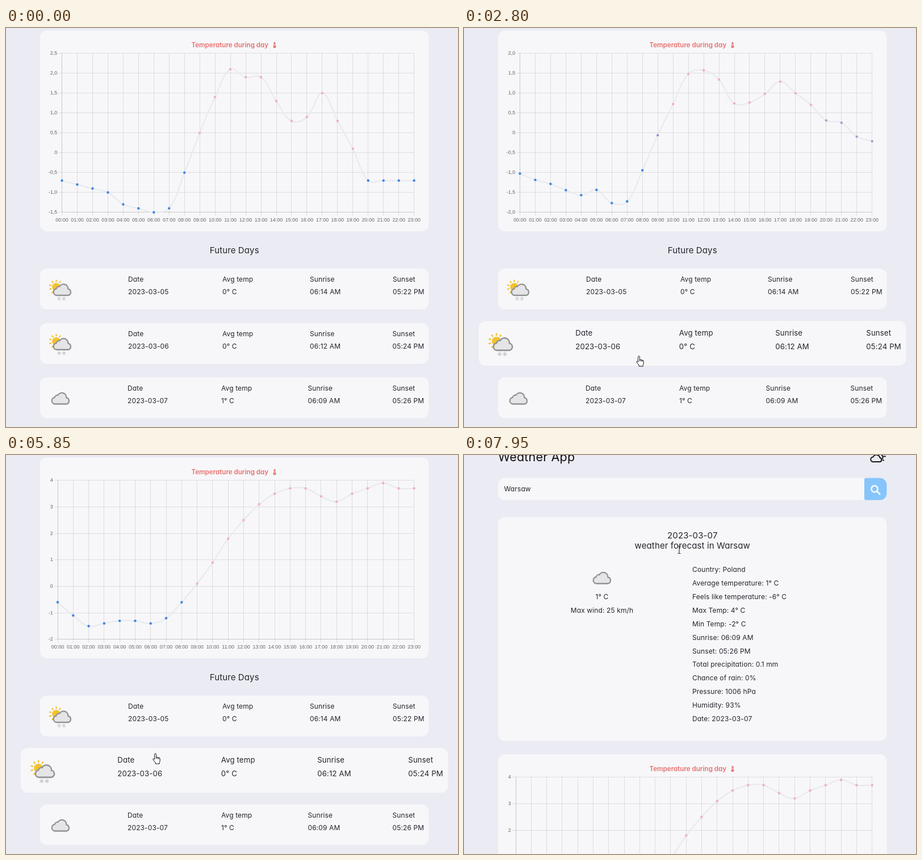
An HTML page for the animation above (8 s loop, 796 by 703 pixels).

```html
<!DOCTYPE html>
<html lang="en">
<head>
<meta charset="utf-8">
<title>Weather App</title>
<style>
  html, body { margin: 0; width: 100%; height: 100%; overflow: hidden; background: #ebebf4; }
  svg { display: block; }
  text { font: 12px Inter, "Open Sans", sans-serif; font-feature-settings: "cv11"; letter-spacing: .12px; fill: #23252b; white-space: pre; }
  .mid { text-anchor: middle; }
  .head { font-size: 15px; }
  .brand { font-size: 21.6px; fill: #111; }
  .title { font-size: 11.6px; font-weight: 600; letter-spacing: 0; fill: #e6716e; }
  .tick { font: 9px "Liberation Sans", Arial, sans-serif; letter-spacing: 0; fill: #666; }
  .end { text-anchor: end; }
  .card { fill: #f7f7fa; }
  .grid { fill: none; stroke: #000; stroke-opacity: .1; }
  .curve { fill: none; stroke: #e9eaee; stroke-width: 2.25; }
  .cloud { fill: #e5e5e7; stroke: #929294; stroke-width: 2.3; stroke-linejoin: round; }
  .ray { stroke: #efbd2d; stroke-width: 2; stroke-linecap: round; }
  .flake { stroke: #c6c6ca; stroke-width: 1.2; stroke-linecap: round; fill: none; }
  .cursor { fill: #fff; stroke: #111; stroke-width: 1; stroke-linejoin: round; }
  .line { fill: none; stroke: #16171b; stroke-width: 2; stroke-linecap: round; }
</style>
</head>
<body>
<svg id="stage" width="796" height="703" viewBox="0 0 796 703"></svg>
<script>
const LOOP = 8000, HOVER = 300, MORPH = 1000;
const TOP = 44.8, HEIGHT = 280, RIGHT = 718.7;

const days = [
  { left: 98.5, max: 2.5, min: -1.5, step: .5,
    temps: [-.7, -.8, -.9, -1, -1.3, -1.4, -1.5, -1.4, -.5, .5, 1.4, 2.1, 1.9, 1.9, 1.3, .8, .9, 1.5, .8, .1, -.7, -.7, -.7, -.7] },
  { left: 98.5, max: 2, min: -2, step: .5,
    temps: [-.9, -1.1, -1.2, -1.4, -1.4, -1.1, -1.6, -1.6, -.9, -.1, .6, 1.4, 1.7, 1.3, .7, 1.1, 1.4, 1.5, 1.5, 1.5, 1.4, 1.3, .7, .5] },
  { left: 91, max: 4, min: -2, step: 1,
    temps: [-.6, -1.1, -1.5, -1.4, -1.3, -1.3, -1.4, -1.2, -.6, .1, .9, 1.8, 2.5, 3.1, 3.5, 3.7, 3.7, 3.4, 3.2, 3.5, 3.7, 3.9, 3.7, 3.7] }
];
const switches = [2605, 4260];

const rows = [
  { date: "2023-03-05", temp: "0° C", rise: "06:14 AM", set: "05:22 PM", snow: true, cols: [215, 381, 535, 681],
    hover: [[971, 1085], [1135, 1565], [5938, 6027]] },
  { date: "2023-03-06", temp: "0° C", rise: "06:12 AM", set: "05:24 PM", snow: true, cols: [215, 381, 535, 680.5],
    hover: [[861, 944], [1625, 3470], [5330, 5910]] },
  { date: "2023-03-07", temp: "1° C", rise: "06:09 AM", set: "05:26 PM", snow: false, cols: [214, 379, 531.5, 680.5],
    hover: [[690, 830], [3555, 5250]] }
];

// time, x, y of the pointer's hot spot
const route = [
  [660, 285, 700], [800, 288, 640], [900, 290, 560], [1000, 292, 470], [1090, 293, 416], [1220, 296, 440],
  [1430, 298, 465], [1565, 301, 499], [1625, 302, 520], [1710, 305, 557], [1850, 307, 574], [1980, 308, 578],
  [3360, 308, 578], [3480, 311, 598], [3560, 314, 618], [3750, 321, 650], [4050, 324, 660], [5090, 324, 660],
  [5250, 310, 614], [5330, 303, 590], [5600, 270, 535], [5850, 263, 526], [6200, 263, 526], [6770, 293, 522],
  [7100, 315, 400], [7540, 340, 173], [7680, 364, 156], [7830, 364, 156], [7950, 379, 167]
];

const clamp = (v, lo, hi) => Math.min(hi, Math.max(lo, v));
const mix = (a, b, k) => a + (b - a) * k;
const label = (x, y, s, cls = "") => `<text x="${x}" y="${y}" class="${cls}">${s}</text>`;
const card = (y, h) => `<rect class="card" x="60" y="${y}" width="684.4" height="${h}" rx="12"/>`;
const cloud = (x, y) => `<path class="cloud" transform="translate(${x} ${y})"
  d="M7 21.5A5.8 5.8 0 0 1 6.6 10A5 5 0 0 1 12.3 6A8 8 0 0 1 27.3 10.3A5.7 5.7 0 0 1 27.3 21.5Z"/>`;

function sun(x, y) {
  let out = `<circle cx="${x}" cy="${y}" r="7.3" fill="#f4c22b"/>`;
  for (let a = 90; a <= 315; a += 36) {
    const c = Math.cos(a * Math.PI / 180), s = -Math.sin(a * Math.PI / 180);
    out += `<path class="ray" d="M${x + 9.8 * c} ${y + 9.8 * s}L${x + 12.2 * c} ${y + 12.2 * s}"/>`;
  }
  return out + `<path class="ray" d="M${x + 5.8} ${y - 8}l1.4 -2"/>`;
}

const flake = (x, y) => `<path class="flake" d="M${x} ${y - 3}v6M${x - 2.6} ${y - 1.5}l5.2 3M${x - 2.6} ${y + 1.5}l5.2 -3"/>`;

function rowMarkup(r, i) {
  const y = 424 + i * 95.75;
  const icon = r.snow
    ? sun(88.5, y + 32.5) + cloud(82, y + 25.5) + flake(93.5, y + 53) + flake(102, y + 53)
    : cloud(79, y + 25.5);
  const pairs = [["Date", r.date], ["Avg temp", r.temp], ["Sunrise", r.rise], ["Sunset", r.set]];
  const texts = pairs.map(([a, b], n) => label(r.cols[n], y + 23.3, a) + label(r.cols[n], y + 45.2, b)).join("");
  return `<g id="row${i}">${card(y, 71.7)}${icon}<g>${texts}</g></g>`;
}

const pointX = (d, h) => mix(d.left, RIGHT, h / 23);
const pointY = (d, v) => TOP + (d.max - v) / (d.max - d.min) * HEIGHT;
const crisp = v => Math.floor(v) + .5;

function axes(d, i) {
  const x0 = crisp(d.left), y0 = crisp(TOP), y1 = crisp(TOP + HEIGHT);
  let path = `M${x0} ${y0}V${y1}M${x0} ${y1}H${RIGHT}`, out = "";
  for (let h = 0; h < 24; h++) {
    path += `M${crisp(pointX(d, h))} ${y0}V${y1 + 6}`;
    out += label(pointX(d, h), 341.2, String(h).padStart(2, "0") + ":00", "tick mid");
  }
  for (let v = d.max; v >= d.min; v -= d.step) {
    const y = pointY(d, v);
    path += `M${x0 - 6} ${crisp(y)}H${RIGHT}`;
    out += label(d.left - 8.3, y + 2.6, v && d.step < 1 ? v.toFixed(1).replace(".", ",") : v, "tick end");
  }
  return `<g id="axes${i}"><path class="grid" d="${path}"/>${out}</g>`;
}

const facts = ["Country: Poland", "Average temperature: 1° C", "Feels like temperature: -6° C", "Max Temp: 4° C",
  "Min Temp: -2° C", "Sunrise: 06:09 AM", "Sunset: 05:26 PM", "Total precipitation: 0.1 mm", "Chance of rain: 0%",
  "Pressure: 1006 hPa", "Humidity: 93%", "Date: 2023-03-07"];

const header = label(60, -512.3, "Weather App", "brand") +
  `<path class="line" d="M720.5 -511A4.2 4.2 0 0 1 720.5 -519.4A6.4 6.4 0 0 1 732.6 -518A3.6 3.6 0 0 1 732.6 -511Z
    M731 -524A5 5 0 0 1 737 -517M739.5 -520.5H742M737.5 -514.5l1.5 1"/>` +
  card(-482.5, 39) + label(70.5, -459.3, "Warsaw") +
  `<path fill="#86c5fc" d="M708 -482.5H732.4A12 12 0 0 1 744.4 -470.5V-455.5A12 12 0 0 1 732.4 -443.5H708A3 3 0 0 1 705 -446.5V-479.5A3 3 0 0 1 708 -482.5Z"/>
  <g fill="none" stroke="#f4f7fb" stroke-width="2.7" stroke-linecap="round"><circle cx="723" cy="-463.3" r="5.6"/><path d="M727.3 -459L732.3 -454"/></g>`;

const forecast = card(-413.6, 394.4) + label(402.3, -375.6, "2023-03-07", "head mid") +
  label(402.3, -357.6, "weather forecast in Warsaw", "head mid") + cloud(226, -318) +
  label(243, -269.4, "1° C", "mid") + label(243, -245.4, "Max wind: 25 km/h", "mid") +
  facts.map((s, i) => label(402, -317.2 + i * 23.95, s)).join("");

const chart = card(4.6, 353.6) + label(326.5, 34, "Temperature during day", "title") +
  `<path d="M473 26.2V32" stroke="#e6716e" stroke-width="3" stroke-linecap="round"/><circle cx="473" cy="32.8" r="2.5" fill="#e6716e"/>
  <path d="M473 27.5V32.5" stroke="#f7f7fa" stroke-width=".8"/>` +
  days.map(axes).join("") + `<path id="curve" class="curve"/>` +
  days[0].temps.map(() => `<circle class="dot" r="2.2"/>`).join("");

stage.innerHTML = `<g id="page">${header}${forecast}${chart}${label(402.2, 396.5, "Future Days", "head mid")}${rows.map(rowMarkup).join("")}</g>
  <g id="pointer" class="cursor">
    <path id="arrow" d="M0 0V13L3 10.3L5 15L7 14.1L5 9.7H9Z"/>
    <path id="hand" d="M-1.4 1.4a1.4 1.4 0 0 1 2.8 0V6.3l5.4 1.1q1.5 .4 1.4 2v3.4q0 1.5 -1 2.8v2.4H.2V16L-4 10.8q-.7 -1.3 .5 -1.7q1 -.2 2.1 1.3ZM1.4 6.3v3M4 7v2.5M6.2 7.4v2.5"/>
    <path id="beam" fill="none" d="M-2.5 -6.5H-.8L0 -5.8L.8 -6.5H2.5M0 -5.8V5.8M-2.5 6.5H-.8L0 5.8L.8 6.5H2.5"/>
  </g>`;

const el = id => document.getElementById(id);
const dots = [...document.querySelectorAll(".dot")];
const show = (node, on) => node.style.display = on ? "" : "none";

// the CSS "ease" curve
function ease(x) {
  if (x <= 0) return 0;
  if (x >= 1) return 1;
  let lo = 0, hi = 1;
  for (let i = 0; i < 20; i++) {
    const u = (lo + hi) / 2;
    if (.75 * u * (1 - u) + u ** 3 < x) lo = u; else hi = u;
  }
  return .3 * lo * (1 - lo) ** 2 + 3 * lo * lo * (1 - lo) + lo ** 3;
}

function hoverAt(spans, t) {
  let from = 0, goal = 0, start = -HOVER;
  const value = at => mix(from, goal, ease((at - start) / HOVER));
  for (const [enter, leave] of spans)
    for (const [at, next] of [[enter, 1], [leave, 0]])
      if (at <= t) { from = value(at); goal = next; start = at; }
  return value(t);
}

function scrollAt(t) {
  if (t < 6200) return 242 * clamp((t - 5900) / 300, 0, 1);
  return 242 + 281 * (1 - (1 - clamp((t - 6200) / 620, 0, 1)) ** 2);
}

function spline(p) {
  const bottom = TOP + HEIGHT, n = p.length;
  const ctrl = p.map((c, i) => {
    const a = p[Math.max(0, i - 1)], b = p[Math.min(n - 1, i + 1)];
    const da = Math.hypot(c.x - a.x, c.y - a.y), db = Math.hypot(b.x - c.x, b.y - c.y);
    const at = k => [c.x + k * (b.x - a.x), clamp(c.y + k * (b.y - a.y), TOP, bottom)];
    return [at(-.4 * da / (da + db)), at(.4 * db / (da + db))];
  });
  let d = `M${p[0].x} ${p[0].y}`;
  for (let i = 1; i < n; i++) d += `C${ctrl[i - 1][1]} ${ctrl[i][0]} ${p[i].x} ${p[i].y}`;
  return d;
}

const tint = v => v < 0 ? [62, 134, 226] : [239, 177, 190];

function drawChart(t) {
  const now = switches.filter(s => t >= s).length;
  const to = days[now], from = days[Math.max(0, now - 1)];
  const k = now ? 1 - (1 - clamp((t - switches[now - 1]) / MORPH, 0, 1)) ** 4 : 1;
  days.forEach((d, i) => show(el("axes" + i), i === now));
  const pts = to.temps.map((v, h) => ({
    x: mix(pointX(from, h), pointX(to, h), k),
    y: mix(pointY(from, from.temps[h]), pointY(to, v), k)
  }));
  el("curve").setAttribute("d", spline(pts));
  dots.forEach((dot, h) => {
    const a = tint(from.temps[h]), b = tint(to.temps[h]);
    dot.setAttribute("cx", pts[h].x);
    dot.setAttribute("cy", pts[h].y);
    dot.setAttribute("fill", `rgb(${a.map((c, i) => Math.round(mix(c, b[i], k)))})`);
  });
}

function drawRows(t) {
  rows.forEach((r, i) => {
    const k = hoverAt(r.hover, t), s = 1 + .1 * k, cy = 459.85 + i * 95.75, g = el("row" + i);
    g.setAttribute("transform", `translate(402.2 ${cy}) scale(${s}) translate(-402.2 ${-cy})`);
    g.lastElementChild.setAttribute("opacity", 1 - .15 * Math.sin(Math.PI * k));
  });
}

function drawPointer(t) {
  show(el("pointer"), t >= 660);
  let i = route.findIndex(p => p[0] > t);
  if (i < 0) i = route.length - 1;
  i = Math.max(1, i);
  const a = route[i - 1], b = route[i], k = clamp((t - a[0]) / (b[0] - a[0]), 0, 1);
  el("pointer").setAttribute("transform", `translate(${Math.round(mix(a[1], b[1], k))} ${Math.round(mix(a[2], b[2], k))})`);
  const onRow = rows.some(r => r.hover.some(([enter, leave]) => t >= enter && t < leave));
  const onText = t > 7600;
  show(el("hand"), onRow);
  show(el("beam"), onText);
  show(el("arrow"), !onRow && !onText);
}

function frame() {
  const t = performance.now() % LOOP;
  el("page").setAttribute("transform", `translate(0 ${Math.round(scrollAt(t))})`);
  drawChart(t);
  drawRows(t);
  drawPointer(t);
  requestAnimationFrame(frame);
}
frame();
</script>
</body>
</html>
```
